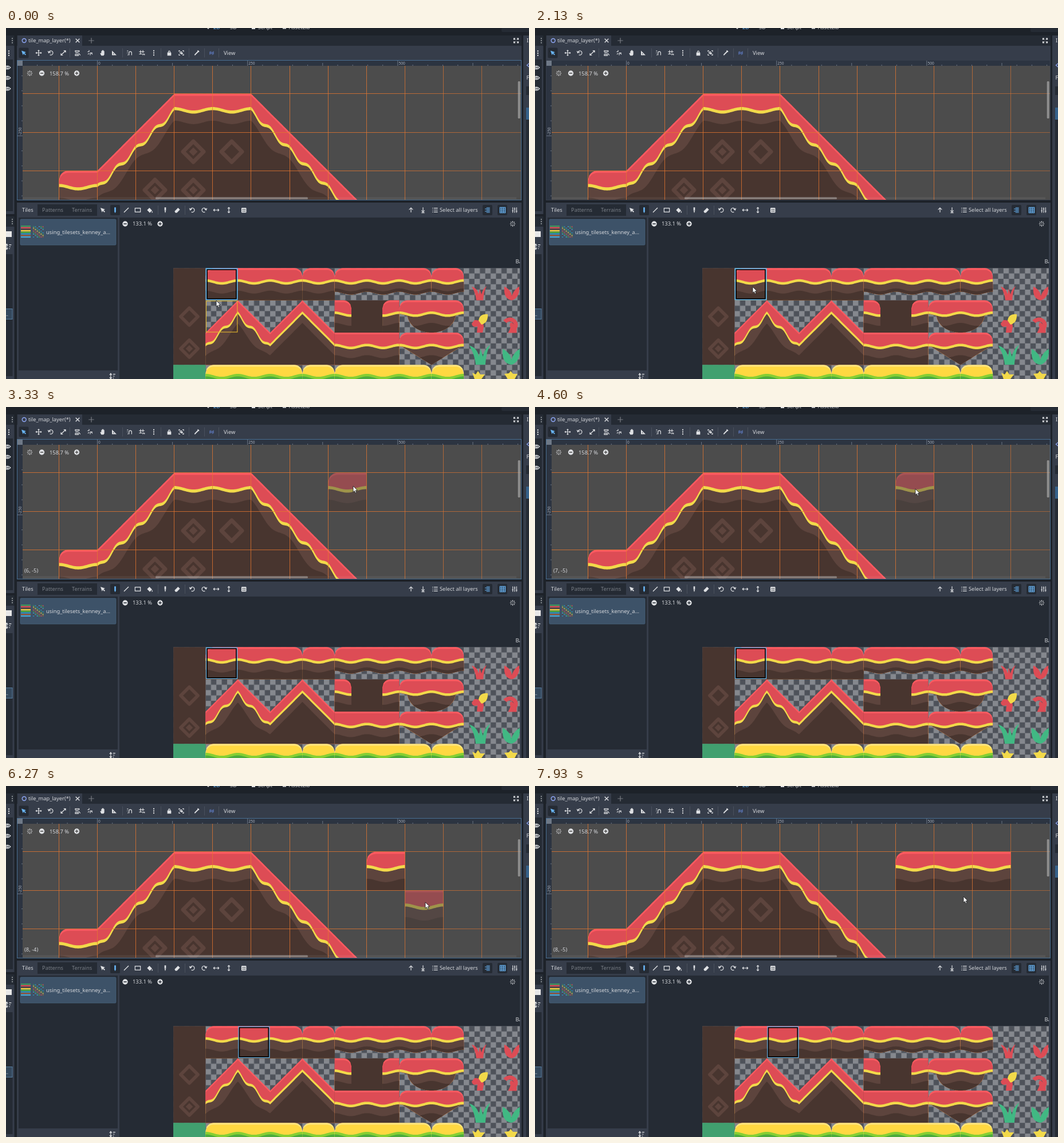
Animation of 913x613 px, one loop 8000 ms. Source, as an HTML page:

```html
<!DOCTYPE html>
<html lang="en">
<head>
<meta charset="utf-8">
<title>Tile painting</title>
<style>
html, body { margin: 0; width: 100%; height: 100%; overflow: hidden; background: #1d2229; }
svg { display: block; width: 913px; height: 613px; }
text { font: 9.33px "Noto Sans", sans-serif; fill: #d6d8dc; white-space: pre; }
.dim { fill: #7b8088; }
.tick { font-size: 6.6px; fill: #a9b0bb; }
</style>
</head>
<body>
<svg id="stage" viewBox="0 0 913 613" xmlns="http://www.w3.org/2000/svg"></svg>
<script>
const LOOP = 8000, STEP = 200 / 3;
const CELL = 67.12, GX = 159.5, GY = 450.5;        // map grid
const S = 56.33, AX = 292.1, AY = 419.3;           // atlas grid
const BASE = '#363d4a', PANEL = '#252b34', DARK = '#1d2229', INK = '#dfe1e4', BLUE = '#69b4f4';
const SOIL = '#48352f', CLAY = '#5d443d';
const RED = ['#ff5a60', '#dd4c55', '#f2d94a', CLAY, SOIL];
const GOLD = ['#ffe57c', '#ffd841', '#86cf33', '#4bab3d', '#3d9a5c'];
const TAU = Math.PI * 2;

const rect = (x, y, w, h, fill, more = '') =>
  `<rect x="${x}" y="${y}" width="${w}" height="${h}" fill="${fill}" ${more}/>`;
const text = (x, y, s, more = '') => `<text x="${x}" y="${y}" ${more}>${s}</text>`;
const path = (d, fill, more = '') => `<path d="${d}" fill="${fill}" ${more}/>`;
const range = (n, f) => Array.from({ length: n }, (_, i) => f(i)).join('');

// ---- terrain: bands stacked below an edge, measured in tiles
const bump = (a, k) => u => a * (1 - Math.cos(TAU * k * u));
const flat = bump(.045, 1), steps = bump(.067, 2);

function ground(o) {
  o = { n: 1, lip: .345, base: () => 0, wave: flat, bot: () => 1, dark: u => .7 + flat(u), pal: RED, ...o };
  const R = .25, m = Math.ceil(o.n * 28);
  const arc = d => d < R ? R - Math.sqrt(R * R - (R - d) ** 2) : 0;
  const top = u => o.base(u) + (o.l ? arc(u) : 0) + (o.r ? arc(o.n - u) : 0);
  const pt = (u, v) => (o.x + u * o.s).toFixed(1) + ' ' + (o.y + v * o.s).toFixed(1);
  const band = (f, fill) => {
    const a = [], b = [];
    for (let i = 0; i <= m; i++) {
      const u = i * o.n / m, v = o.bot(u);
      a.push(pt(u, Math.min(f(u), v)));
      b.unshift(pt(u, v));
    }
    return path('M' + a.concat(b).join('L') + 'Z', fill);
  };
  const lines = [top, u => top(u) + .055, u => o.base(u) + o.lip + o.wave(u),
    u => o.base(u) + o.lip + .08 + o.wave(u), u => o.base(u) + o.dark(u)];
  return lines.map((f, i) => band(f, o.pal[i])).join('');
}

const diamond = (x, y, r, core) =>
  path(`M${x - r} ${y}L${x} ${y - r}L${x + r} ${y}L${x} ${y + r}Z`, 'none',
    `stroke="${CLAY}" stroke-width="${r * .38}" stroke-linejoin="round"`) +
  (core ? path(`M${x - r * .42} ${y}l${r * .42} ${-r * .42} ${r * .42} ${r * .42} ${-r * .42} ${r * .42}Z`, CLAY) : '');

// ---- icons on a 16 unit box centred on the origin
const icon = (x, y, d, { c = INK, fill, w = 1.8, o = 1 } = {}) =>
  `<path transform="translate(${x} ${y}) scale(.667)" d="${d}" opacity="${o}" fill-rule="evenodd" ` +
  (fill ? `fill="${c}"` : `fill="none" stroke="${c}" stroke-width="${w}"`) + '/>';
const F = { fill: 1 };
const ARROW = 'M-6-6L-2 6 0 2 4 6 6 4 2 0 6-2Z';
const DOTS = 'M-1.5-7h3v3h-3zM-1.5-1.5h3v3h-3zM-1.5 4h3v3h-3z';
const PLUS = 'M-7 0a7 7 0 1 0 14 0a7 7 0 1 0-14 0M-4-1H-1V-4H1V-1H4V1H1V4H-1V1H-4Z';
const MINUS = 'M-7 0a7 7 0 1 0 14 0a7 7 0 1 0-14 0M-4-1H4V1H-4Z';
const CENTER = 'M0-7V-3M0 3V7M-7 0H-3M3 0H7M-1 0H1M-5-5l2 2M5-5l-2 2M-5 5l2-2M5 5l-2-2';
const EXPAND = 'M-6-2V-6H-2M2-6H6V-2M6 2V6H2M-2 6H-6V2M-6-6l4 4M6-6l-4 4M6 6l-4-4M-6 6l4-4';
const TURN = 'M-5-1A5.5 5.5 0 1 1-2 5M-7-5l2 5 4-3';
const PEN = 'M-2-7H2V4L0 8-2 4Z';
const SORT = 'M-4-6V6M-7-3l3-4 3 4M-7 3l3 4 3-4M2-5H8M2 0H6M2 5H4';
const LIST = 'M-7-5h2M-7 0h2M-7 5h2M-3-5H7M-3 0H7M-3 5H7';
const EYE = 'M-8 0Q0-9 8 0Q0 9-8 0ZM-2.5 0a2.5 2.5 0 1 0 5 0a2.5 2.5 0 1 0-5 0';

function toolbars() {
  const sep = (x, y) => rect(x, y - 8, 1, 16, '#4a515d');
  const top = [
    [31, ARROW, { c: BLUE, fill: 1 }],
    [57, 'M0-7V7M-7 0H7M-2-5l2-2 2 2M-2 5l2 2 2-2M-5-2l-2 2 2 2M5-2l2 2-2 2'],
    [78, 'M-5-1A5.5 5.5 0 1 1-2 5M-7-5l2 5 4-3M-1 0h2'],
    [100, 'M-6 6L6-6M1-6H6V-1M-6 1V6H-1'],
    [125, 'M-6-6H4V-3H-6ZM-6 0H2M-6 4H2V7H-6ZM3 1l4 5'],
    [147, 'M-3-7V-3M-7-3H-3M1-1l5 5M0 0V6M0 0H6M-6 4l3-3'],
    [169, 'M-4 7L-7 1 -5 0-4 1V-5H-2V-1-7H0V-1-7H2V-1-5H4V4L2 7Z', F],
    [189, 'M-6-6V6H6ZM-3 0V3H0Z', F],
    [216, 'M-7-5h3M-7 0h2M-2 6V0A3.5 3.5 0 0 1 5 0V6M-6 5h2'],
    [237, 'M-3-7V3M3-7V0M-7-3H7M-7 3H1M3 6V3H7V6'],
    [258, DOTS, F],
    [285, 'M-5-1H5V7H-5ZM-3-1V-3A3 3 0 0 1 3-3V-1H1.3V-3A1.3 1.3 0 0 0-1.3-3V-1Z', F],
    [306, 'M-6-3V-6H-3M3-6H6V-3M6 3V6H3M-3 6H-6V3M-3-3H1V1H-3ZM0 0H3V3H0Z'],
    [333, 'M-6 4L2-4 2-7 5-6 7-3 4-2-4 6-5 7Z', F],
    [359, 'M-6-3L-1-5V-1L6-5V3L1 6V2L-6 5Z', { c: '#5870ad', fill: 1, o: .75 }],
  ].map(([x, d, o]) => icon(x, 43.5, d, o)).join('');
  const low = [
    [169, ARROW, F],
    [210, 'M-6 6L6-6', { w: 2 }],
    [230, 'M-7-5H7V5H-7Z'],
    [251, 'M-7 0L-1-6 6 1 0 7ZM6 2l2 4-3 1Z', F],
    [278, 'M-2-7H2V1H-2ZM-2 2H2L0 8Z', F],
    [299, 'M-7 3L2-6 7-1-1 7H-5Z', F],
    [325, TURN],
    [367, 'M-7 0H7M-4-3l-3 3 3 3M4-3l3 3-3 3'],
    [389, 'M0-7V7M-3-4l3-3 3 3M-3 4l3 3 3-3'],
    [707, 'M0 6V-6M-5-1l5-5 5 5'],
    [728, 'M0-7V4M-4 1l4 4 4-4M-4 7H4'],
    [749, LIST],
    [840, 'M-2-6H7M-6-3H7M-2 0H7M-6 3H7M-2 6H7', { c: BLUE }],
    [867, 'M-7-7H7V7H-7ZM-7-2.3H7M-7 2.3H7M-2.3-7V7M2.3-7V7', { c: BLUE }],
    [888, 'M-5-7V7M0-7V7M5-7V7M-7 2h4M-2-3h4M3 3h4', { w: 1.6 }],
  ].map(([x, d, o]) => icon(x, 318, d, o)).join('');
  const pressed = (x, y) => rect(x, y, 17, 18, PANEL, 'rx="2"');
  return pressed(22.5, 34.5) + top +
    [111, 203, 270, 319, 346, 371].map(x => sep(x, 43.5)).join('') + text(380, 47, 'View') +
    pressed(182, 309) + pressed(832, 309) + pressed(858, 309) + low +
    `<g transform="matrix(-1 0 0 1 692 0)">${icon(346, 318, TURN)}</g>` +
    rect(411, 314, 8.5, 8.5, INK, 'rx="1"') + path('M413 316h1.6v1.6h-1.6zM416 319h1.6v1.6h-1.6zM416 316h1.6v1.6h-1.6zM413 319h1.6v1.6h-1.6z', DARK) +
    [265, 312].map(x => sep(x, 318)).join('') + text(757, 321.3, 'Select all layers');
}

function frame() {
  return rect(0, 0, 913, 613, DARK) + rect(865, 0, 48, 7, PANEL, 'rx="2"') +
    path('M351 0h4l-2 2z', INK) + text(362, 1.6, '2D', `style="fill:${BLUE}"`) + text(391, 1.6, '3D') +
    rect(429, 0, 6, 2, INK) + text(440, 1.6, 'Script') + rect(483, 0, 6, 1.5, INK) + text(494, 1.6, 'AssetLib') +
    // left dock
    rect(0, 13, 14.5, 18, PANEL) + rect(0, 31, 14.5, 294, BASE) + rect(0, 55, 12, 265, PANEL) +
    rect(0, 329, 14.5, 18, PANEL) + rect(0, 347, 14.5, 266, BASE) + rect(0, 395, 11.5, 213, PANEL) +
    icon(11, 22, DOTS, { ...F, o: .55 }) + icon(5, 44, DOTS, F) + icon(11, 338, DOTS, { ...F, o: .55 }) +
    [69, 87, 106].map(y => icon(2.5, y, EYE)).join('') + rect(0, 355, 10, 10, '#e8e8e8') + icon(4, 382, SORT) +
    rect(-2, 490.5, 13, 18, '#35495d', 'stroke="#577d9e"') + text(-1, 503, '..') +
    // right dock
    rect(903, 13, 10, 600, BASE) + text(909, 25, 'I') + text(908.5, 90, 'F') +
    icon(912, 65, 'M2-5L-4 0 2 5', { c: '#8da5f3' }) + rect(908, 102, 5, 15, PANEL) +
    rect(908, 139, 5, 21, '#35618a') + rect(908, 160, 5, 453, PANEL) +
    // scene tabs
    rect(19, 13, 881, 18, PANEL) + rect(20, 13, 113, 18, BASE) + rect(19, 31, 881, 270, BASE) +
    `<circle cx="31.7" cy="22" r="3.4" fill="none" stroke="#8da5f3" stroke-width="1.5"/>` +
    text(39, 25, 'tile_map_layer(*)') + icon(125, 22, 'M-5-5L5 5M5-5L-5 5', { w: 2 }) +
    icon(149, 22, 'M0-7V7M-7 0H7', { o: .45 }) + icon(890.5, 22, EXPAND) +
    // lower panel
    rect(19, 305, 881, 308, BASE) + rect(55, 308, 104, 20, PANEL) +
    text(28, 321.3, 'Tiles') + text(63, 321.3, 'Patterns', 'class="dim"') + text(115, 321.3, 'Terrains', 'class="dim"') +
    rect(22, 331, 173, 267, PANEL) + rect(198, 331, 699, 282, PANEL) +
    rect(25, 334, 167, 45, '#3d5268', 'rx="1.5" stroke="#48637c" stroke-width=".8"') + thumb() +
    text(70, 359.6, 'using_tilesets_kenney_a...') + icon(185.5, 608, SORT) +
    toolbars() + icon(208, 342, MINUS, F) + text(221, 345.3, '133.1 %') + icon(269, 342, PLUS, F) + icon(884.5, 342, CENTER);
}

function thumb() {
  const hues = ['#3d9a5c', '#dd4c55', '#5d443d', '#ffd841', '#4bab3d', '#2f94c4', '#9b5a3c', '#46a7d8'];
  return range(8, i => rect(26, 345 + i * 2.7, 17, 2.2, hues[i]) +
    range(6, j => rect(47 + j * 3.3, 346 + i * 2.6, 2.2, 1.8, hues[(i * 3 + j * 5) % 8], 'opacity=".7"')));
}

// ---- map view
function rulers() {
  const k = CELL / 64;
  const x = i => (GX + i * 25 * k).toFixed(1), y = i => (GY - i * 25 * k).toFixed(1);
  const len = i => i % 10 === 0 ? 9 : i % 5 === 0 ? 5 : 2;
  let d = '';
  for (let i = -4; i < 29; i++) d += `M${x(i)} 66v${-len(i)}`;
  for (let i = 6; i < 15; i++) d += `M29 ${y(i)}h${-len(i)}`;
  return rect(20, 57, 879, 9, '#2c3441') + rect(20, 57, 9, 243, '#2c3441') + rect(20, 57, 9, 9, '#6f7987') +
    path(d, 'none', 'stroke="#7d8796" stroke-width=".8"') +
    [0, 250, 500].map((v, i) => text(+x(i * 10) + 1.5, 63.8, v, 'class="tick"')).join('') +
    text(0, 0, '-250', 'class="tick" transform="translate(26.6 187) rotate(-90)"');
}

const col = c => GX + c * CELL, row = r => GY + r * CELL;
const mapTile = (c, l) => ground({ x: col(c), y: row(-5), s: CELL, l });
const crisp = v => Math.floor(v) + .5;

function map() {
  const slope = u => (u > 1 && u < 3) || u > 5;
  const hill = ground({
    x: col(-1), y: row(-5), s: CELL, n: 8, l: 1, bot: () => 3,
    base: u => u < 1 ? 2 : u < 3 ? 3 - u : u < 5 ? 0 : u - 5,
    wave: u => slope(u) ? steps(u) : flat(u),
    dark: u => .7 + (slope(u) ? bump(.11, 1)(u) : flat(u)),
  });
  const lines = range(12, i => `M${crisp(col(i - 1))} 66V300`) + range(3, i => `M29 ${crisp(row(i - 5))}H899`);
  return `<g clip-path="url(#view)">` + rect(29, 66, 870, 234, '#4c4c4c') + hill +
    diamond(327, 216, 18, 1) + diamond(394, 216, 18) + diamond(260, 283, 18, 1) + diamond(327, 283, 18, 1) +
    range(3, i => `<g id="put${i}">${mapTile(7 + i, !i)}</g>`) +
    `<g id="ghost" opacity=".5"><g id="left">${mapTile(0, 1)}</g><g id="mid">${mapTile(0, 0)}</g></g>` +
    path(lines, 'none', 'stroke="url(#fade)"') +
    rect(29, 295.5, 862, 3.5, '#fff', 'opacity=".06"') + rect(261, 295.5, 266, 3.5, '#bbb', 'rx="1.5" opacity=".5"') +
    rect(893.7, 93, 4, 65, '#bbb', 'rx="1.5" opacity=".6"') + `</g>` + rulers() +
    icon(41.5, 79, CENTER) + icon(62.5, 79, MINUS, F) + text(76, 82.5, '158.7 %') + icon(123.5, 79, PLUS, F) +
    text(32, 288.6, '', 'id="coord"') +
    rect(19.5, 56.5, 880, 244, 'none', 'id="focus" stroke="#4a6f92"');
}

// ---- atlas view
const tx = c => AX + c * S, ty = r => AY + r * S;

function plants() {
  const R = RED[1], G = '#41b883', Y = '#f2d94a';
  const put = (d, x, y, k, c) => path(d, c, `transform="translate(${x} ${y}) scale(${k})"`);
  const BLADES = 'M-5 0C-6-10-9-17-13-24C-4-21-2-15-1-10L1-20 4-10C5-16 8-21 13-25C9-17 8-10 7 0Z';
  const LEAVES = 'M0 0C-12-2-14-12-13-24C-4-20 0-12 0-7C2-14 6-20 13-24C14-10 8-2 0 0Z';
  return put(BLADES, 826, 475.6, 1, R) + put(LEAVES, 883, 475.6, 1, R) +
    path('M818 510Q834 510 834 522L832 532H822L823 521Q814 524 813 516Z', R) + path('M825 511Q827 498 841 500Q842 515 830 518Z', Y) +
    path('M871 513A10 9 0 1 1 888 524V529H882Q887 519 880 517', 'none', `stroke="${R}" stroke-width="7"`) +
    put(BLADES, 827, 588, 1.4, G) + put(LEAVES, 882, 588, 1.15, G) +
    path('M814 602l6 3 4-6 4 6 8 0-6 8h-12zM870 604l8-1 3-4 4 5 8 0-5 9h-12z', Y);
}

function atlas() {
  const at = (c, r, o) => ground({ x: tx(c), y: ty(r), s: S, ...o });
  const ledge = { bot: u => .73 + flat(u), dark: u => .63 + flat(u) };
  const tops = (r, o) => at(1, r, { n: 3, l: 1, r: 1, ...o }) + at(4, r, { l: 1, r: 1, ...o }) +
    at(5, r, { n: 3, l: 1, r: 1, ...ledge, ...o }) + at(8, r, { l: 1, r: 1, ...ledge, ...o });
  const hang = f => ({ n: 2, l: 1, r: 1, bot: u => Math.max(.43 + flat(u), f(u)) });
  const bowl = u => .42 + .58 * Math.sqrt(Math.max(0, 1 - ((u - 1) / .75) ** 2));
  const peaks = { n: 4, base: u => Math.abs(u % 2 - 1), bot: () => 2,
    wave: u => u < 2 ? steps(u) : 0, dark: u => u < 2 ? .72 + bump(.09, 1)(u) : .7 };
  return `<g clip-path="url(#sheet)">` + rect(AX, AY, 606, 194, 'url(#checker)') +
    rect(AX, AY, S, S * 3, SOIL) + rect(AX, ty(3), S, S, '#41a06f') +
    diamond(320, 504, 15) + diamond(320, 560, 15, 1) +
    tops(0) + at(1, 1, peaks) +
    rect(tx(5), ty(1), S * 2, S * 2, SOIL) + at(5, 1, { n: .52, r: 1 }) +
    at(6.48, 1, { n: .52, l: 1, wave: u => flat(u + .48), dark: u => .7 + flat(u + .48) }) +
    at(5, 2, { n: 2 }) + at(7, 1, hang(bowl)) + at(7, 2, hang(u => 1 - .62 * Math.abs(u - 1))) +
    tops(3, { pal: GOLD, lip: .28 }) + plants() + text(889.5, 411.3, 'Base Tiles') + `</g>` +
    rect(0, 0, 54.4, 54.4, 'none', 'id="hover" stroke="#e6b92e" stroke-width="1.1"') +
    `<g id="pick">${rect(0, 0, 54, 54, 'none', 'id="rim" stroke="#5fb8f2"')}${rect(1.6, 1.6, 50.8, 50.8, 'none', 'stroke="#000" stroke-width="1.6"')}</g>`;
}

const Q = S / 6;
const stage = document.getElementById('stage');
stage.innerHTML = `<defs>
  <clipPath id="view">${rect(29, 66, 870, 234, '#000')}</clipPath>
  <clipPath id="sheet">${rect(198, 331, 699, 282, '#000')}</clipPath>
  <pattern id="checker" x="${AX}" y="${AY}" width="${Q * 2}" height="${Q * 2}" patternUnits="userSpaceOnUse">
    ${rect(0, 0, Q * 2, Q * 2, '#85888e') + rect(Q, 0, Q, Q, '#4e525a') + rect(0, Q, Q, Q, '#4e525a')}</pattern>
  <linearGradient id="fade" gradientUnits="userSpaceOnUse" x1="650" y1="0" x2="899" y2="0">
    <stop stop-color="#e5762f" stop-opacity=".78"/><stop offset="1" stop-color="#e5762f" stop-opacity=".5"/></linearGradient>
</defs>` + frame() + map() + atlas() +
  `<g id="pen">${icon(190.5, 318, PEN, { c: BLUE, fill: 1 })}</g>` +
  path('M0 0V10.6L2.4 8.4 4.1 12.2 5.9 11.4 4.3 7.7H7.6Z', '#fff', 'id="cursor" stroke="#15171a" stroke-width=".8"');

// ---- motion: time, x, y of the pointer
const route = [
  [0, 367, 476], [67, 367, 476], [200, 378, 455], [467, 378, 455], [933, 194, 323], [1067, 194, 323],
  [1133, 188, 318], [1467, 188, 318], [1733, 330, 468], [1800, 330, 468], [2133, 380, 452], [2200, 380, 452],
  [2533, 598, 150], [2600, 606, 135], [2667, 609, 115], [2733, 609, 108], [2933, 609, 108], [3133, 607, 139],
  [3267, 607, 139], [3333, 606, 138], [4267, 606, 138], [4600, 664, 143], [4933, 664, 143], [5467, 452, 488],
  [5533, 448, 488], [5600, 450, 470], [5667, 449, 459], [5867, 449, 459], [6200, 728, 202], [6267, 732, 203],
  [6533, 735, 190], [6600, 738, 160], [7133, 738, 160], [7467, 800, 155], [7600, 800, 155], [7867, 752, 175], [7933, 748, 193],
];

function pointer(t) {
  const i = route.findIndex(k => k[0] > t);
  if (i < 1) return route.at(i ? -1 : 0).slice(1);
  const [a, b] = [route[i - 1], route[i]], p = (t - a[0]) / (b[0] - a[0]);
  return [a[1] + (b[1] - a[1]) * p, a[2] + (b[2] - a[2]) * p];
}

const el = id => document.getElementById(id);
const show = (id, on) => el(id).style.display = on ? '' : 'none';
const move = (id, x, y) => el(id).setAttribute('transform', `translate(${x} ${y})`);

function draw(now) {
  const t = Math.floor((now % LOOP + 4) / STEP) * STEP % LOOP;
  move('cursor', ...pointer(t));

  // hover feedback trails the pointer by one step
  const [x, y] = pointer(t - STEP + .5);
  const inMap = x > 29 && x < 899 && y > 66 && y < 300;
  const inAtlas = x > AX && x < 897 && y > AY;
  const second = t > 5790;

  show('ghost', inMap);
  show('coord', inMap);
  if (inMap) {
    const cx = Math.floor((x - GX) / CELL), cy = Math.floor((y - GY) / CELL);
    el('coord').textContent = `(${cx}, ${cy})`;
    move('ghost', cx * CELL, (cy + 5) * CELL);
    show('left', !second);
    show('mid', second);
  }
  show('hover', inAtlas);
  if (inAtlas) move('hover', tx(Math.floor((x - AX) / S)) + 1, ty(Math.floor((y - AY) / S)) + 1);
  move('pick', tx(second ? 2 : 1) + 1.1, AY + 1.1);
  el('rim').setAttribute('stroke-width', inAtlas ? 2 : 1.2);

  [4900, 6900, 7460].forEach((at, i) => show('put' + i, t > at));
  show('focus', t < 1460 || (t > 2390 && t < 5790) || t > 6000);
  el('pen').setAttribute('opacity', t > 1390 && t < 1460 ? .5 : 1);
}

(function tick() {
  draw(performance.now());
  requestAnimationFrame(tick);
})();
</script>
</body>
</html>
```
